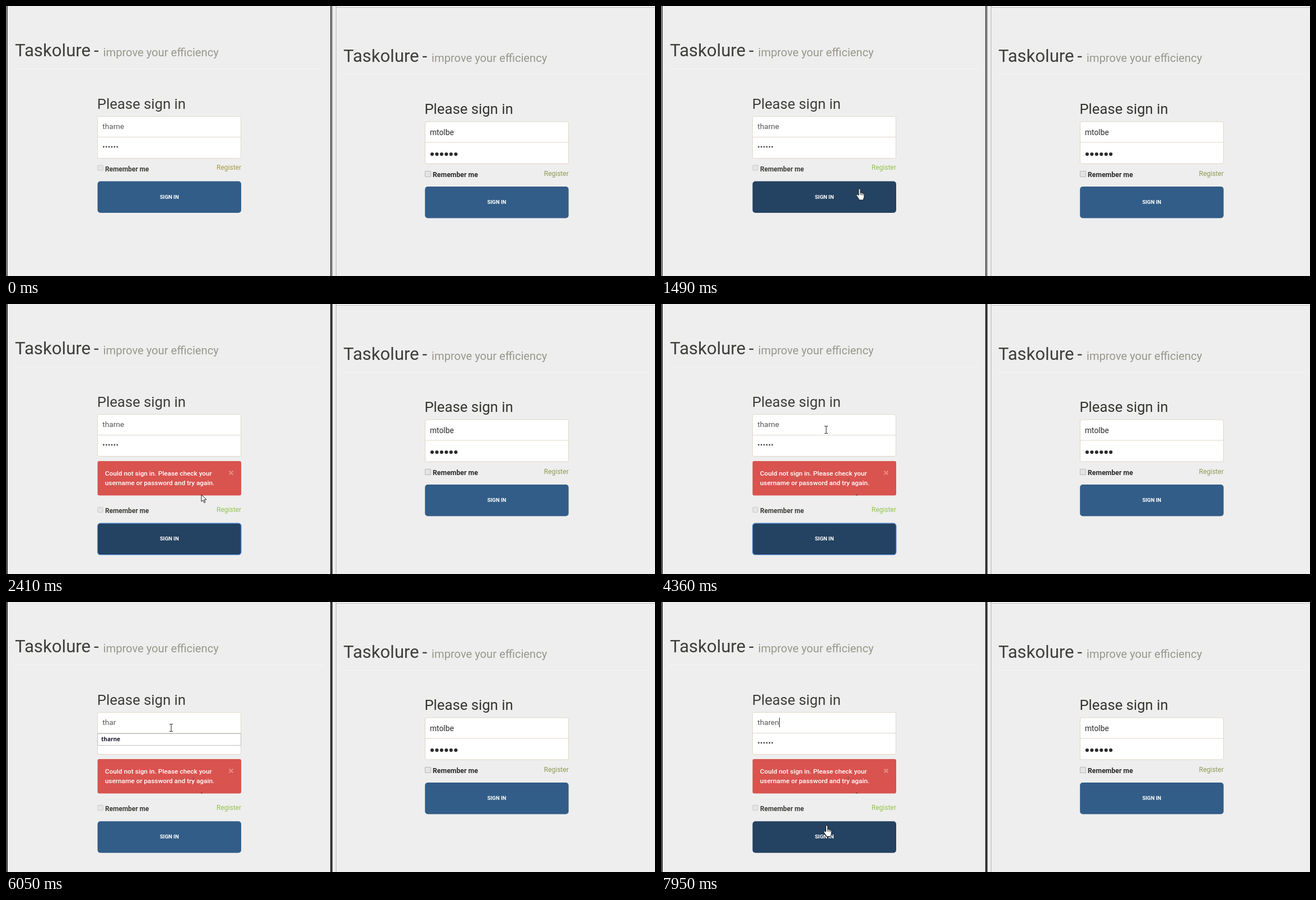
Write an HTML page with a canvas that moves like this. It is 1159x483 px and loops after 8000 ms.

```html
<!DOCTYPE html>
<html lang="en">
<head>
<meta charset="utf-8">
<title>Sign in</title>
<style>
  html, body { margin: 0; width: 100%; height: 100%; overflow: hidden; background: #eee; }
  canvas { display: block; }
</style>
</head>
<body>
<canvas id="stage" width="1159" height="483"></canvas>
<script>
const ctx = document.getElementById('stage').getContext('2d');
const LOOP = 8000;
const INK = '#3e3f3a';
const ARROW = new Path2D('M.5 .5V13l2.9-2.8 2 4.8 2-.9-2-4.6h4Z');
const HAND = new Path2D('M5 12V2a1.5 1.5 0 0 1 3 0V8a1.5 1.5 0 0 1 2.6.6a1.4 1.4 0 0 1 2.4.8' +
  'a1.3 1.3 0 0 1 1.9 1.3V14c0 2-1.2 3-1.4 6.5H6c-.5-2.5-2-3.5-4.6-7.5c-1.2-1.8 1-3 2.1-1.6Z');
const KNUCKLES = new Path2D('M8 8v3.5M10.6 9v3M13 10v2');

// Pointer positions, each held until the next: time, shape, x, y
const POINTER = [
  [0, 'none', 0, 0],
  [310, 'arrow', 911, 436], [390, 'arrow', 800, 388], [470, 'arrow', 697, 342],
  [700, 'arrow', 600, 312], [780, 'arrow', 490, 276], [870, 'beam', 410, 257],
  [1170, 'beam', 408, 264], [1250, 'hand', 392, 283], [1330, 'arrow', 382, 298],
  [1410, 'hand', 354, 320], [1490, 'hand', 348, 326.5], [1570, 'hand', 346, 332],
  [1650, 'hand', 344, 337], [1730, 'hand', 343, 340],
  [2410, 'arrow', 348.5, 340.5], [3350, 'arrow', 341, 326], [3420, 'beam', 335, 311],
  [3740, 'beam', 306, 242], [3800, 'beam', 295, 225],
  [6850, 'beam', 295, 229], [6920, 'beam', 295, 240], [6990, 'beam', 296, 255],
  [7060, 'beam', 296, 268], [7130, 'arrow', 296, 285], [7210, 'beam', 297, 305],
  [7290, 'beam', 297, 323], [7370, 'arrow', 296, 347], [7450, 'arrow', 296, 365],
  [7560, 'arrow', 296, 382.5], [7710, 'arrow', 296.5, 383.5],
  [7870, 'hand', 290, 394], [7950, 'hand', 289.5, 399]
];

// User name as it is edited
const NAME = [[0, 'tharne'], [5360, 'tharn'], [5520, 'thar'], [6230, 'thare'], [6460, 'tharen']];
const CARET = [[0, false], [4430, true], [4970, false], [5360, true], [6050, false],
  [6230, true], [6990, false], [7520, true]];

const at = (track, t) => track.findLast(key => key[0] <= t);

function rect(x, y, w, h, color) {
  ctx.fillStyle = color;
  ctx.fillRect(x, y, w, h);
}

function box(x, y, w, h, r, fill, stroke) {
  ctx.beginPath();
  ctx.roundRect(x, y, w, h, r);
  ctx.fillStyle = fill;
  ctx.fill();
  if (stroke) {
    ctx.strokeStyle = stroke;
    ctx.lineWidth = 1;
    ctx.stroke();
  }
}

function text(str, x, y, size, color, weight = 400, align = 'left', family = 'Roboto') {
  ctx.font = `${weight} ${size}px "${family}", sans-serif`;
  ctx.textAlign = align;
  ctx.fillStyle = color;
  ctx.fillText(str, x, y);
}

function dots(x, y, gap, r, color) {
  ctx.fillStyle = color;
  for (let i = 0; i < 6; i++) {
    ctx.beginPath();
    ctx.arc(x + i * gap, y, r, 0, 7);
    ctx.fill();
  }
}

function heading(x, y) {
  text('Taskolure', x + 1, y, 31.2, INK);
  text('-', x + 142, y, 31.2, INK);
  text('improve your efficiency', x + 158.6, y, 20.15, '#98978b');
  rect(x, y + 22, 551, 1, '#f5f5f4');
}

function fields(x, y, edge) {
  box(x + .5, y + .5, 256, 75, 3, '#fff', edge);
  rect(x, y + 37, 257, 1, edge);
}

function button(x, y, color, outline) {
  box(x, y, 256.5, 56.5, 5, color);
  if (outline) {
    ctx.strokeStyle = '#5b93dc';
    ctx.lineWidth = 1.2;
    ctx.stroke();
  }
  text('SIGN IN', x + 128.2, y + 31, 9.6, '#fff', 700, 'center');
}

function alertBox() {
  box(163.5, 281, 256.5, 61.5, 3, '#d9534f');
  text('Could not sign in. Please check your', 176.8, 306.5, 11.8, '#fff', 500);
  text('username or password and try again.', 176.8, 324, 11.8, '#fff', 500);
  ctx.strokeStyle = '#e58985';
  ctx.lineWidth = 2.4;
  ctx.stroke(new Path2D('M398.5 298.5l7 7m0-7l-7 7'));
}

function pointer([, shape, x, y]) {
  if (shape === 'none') return;
  ctx.save();
  ctx.translate(x, y);
  ctx.lineWidth = 1;
  ctx.strokeStyle = '#1c1c1c';
  ctx.fillStyle = '#fff';
  if (shape === 'beam') {
    ctx.stroke(new Path2D('M-3 -6.5h2.5l.5 .5 .5-.5h2.5M0 -6V6M-3 6.5h2.5l.5-.5 .5 .5h2.5'));
  } else {
    const path = shape === 'hand' ? HAND : ARROW;
    ctx.fill(path);
    ctx.stroke(path);
    if (shape === 'hand') ctx.stroke(KNUCKLES);
  }
  ctx.restore();
}

function leftWindow(t) {
  const active = t >= 1870;
  const failed = t >= 2410;
  const dy = failed ? 78.7 : 0;
  const focused = active && t < 4430;
  const hover = (t >= 1410 && t < 4430) || t >= 7870;

  rect(0, 0, 1, 483, active ? '#6a6a6a' : '#a6a6a6');
  rect(1, 0, 2, 483, active ? '#333' : '#5c5c5c');
  rect(579, 0, 2, 483, active ? '#3a3a3a' : '#5c5c5c');
  rect(581, 0, 2, 483, active ? '#333' : '#8f8f8f');
  rect(583, 0, 1, 483, '#dcdcdc');

  heading(15, 90);
  text('Please sign in', 162.7, 183.5, 25.7, INK);
  fields(163, 197, '#dfd7ca');

  const name = at(NAME, t)[1];
  text(name, 172.3, 220, 13.6, '#555');
  if (at(CARET, t)[1]) {
    rect(Math.round(172.6 + ctx.measureText(name).width), 207, 1, 17, '#222');
  }
  dots(174.4, 252, 4.85, 1.4, '#444');
  if (t >= 5360 && t < 6230) {
    box(163.5, 235.5, 256, 21, 0, '#fff', '#bdbdbd');
    text('tharne', 170, 249, 10, '#15152a', 700, 'left', 'Open Sans');
  }

  if (failed) alertBox();
  // Traces the moving pointer leaves behind
  if (t >= 3350) rect(348, 341, 3, 1.3, '#6b3533');
  if (t >= 3740) rect(334, 312, 1, 7, '#8a4644');

  box(164, 285 + dy, 9, 9, 1, '#e6e6e6', '#c6c6c6');
  text('Remember me', 177, 295.5 + dy, 11.9, INK, 700);
  text('Register', 420, 293 + dy, 12, t < 1250 ? '#a39b45' : '#93c54b', 400, 'right');
  button(163.5, 313.5 + dy, hover ? '#244261' : '#325d88', focused);
}

function rightWindow() {
  rect(589, 0, 570, 2, '#f4f4f4');
  rect(589, 2, 570, 1, '#c2c2c2');
  rect(589, 0, 1, 483, '#b4b4b4');
  heading(601.5, 100);
  text('Please sign in', 747.4, 193, 25.7, '#34352f');
  fields(748, 206.5, '#dfd7c4');
  text('mtolbe', 757, 230.5, 13.8, '#2b2b2b');
  dots(761, 265, 8.45, 3.1, '#2b2b2b');
  box(748.5, 295.5, 10, 10, 0, '#e4e4e4', '#b8b8b8');
  text('Remember me', 762, 306, 12.3, '#2b2b2b', 700);
  text('Register', 1004.7, 304, 12, '#8f9a55', 400, 'right');
  button(748.2, 323, '#325d88');
}

function frame(now) {
  const t = now % LOOP;
  rect(0, 0, 1159, 483, '#eee');
  leftWindow(t);
  rightWindow();
  pointer(at(POINTER, t));
  requestAnimationFrame(() => frame(performance.now()));
}

frame(performance.now());
</script>
</body>
</html>
```
